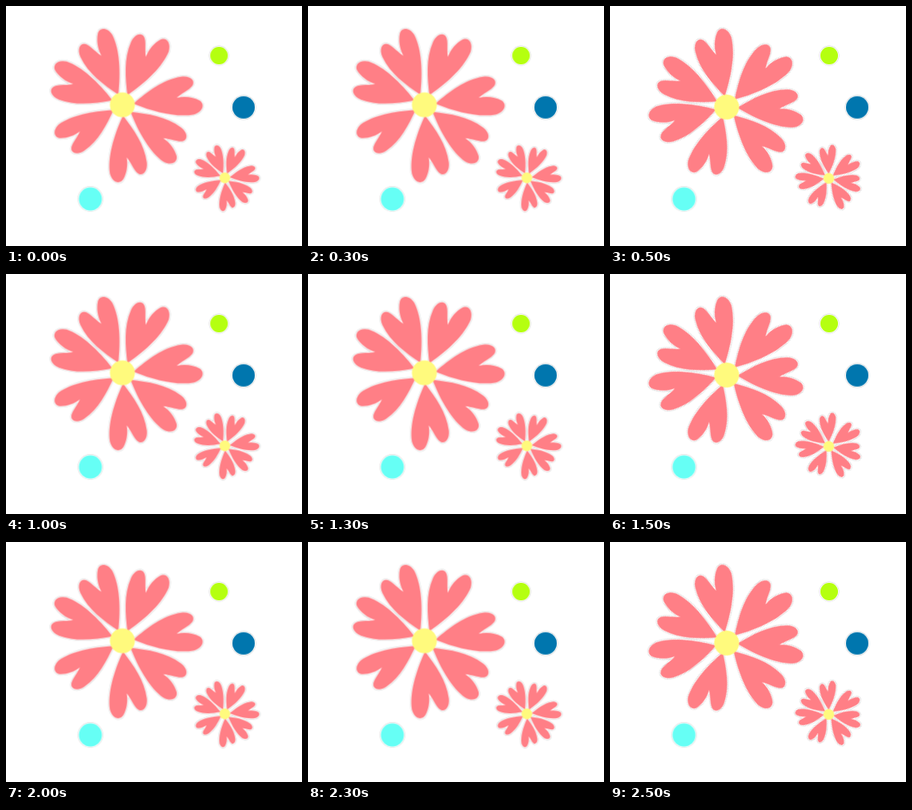
An HTML page for the animation above (3000 ms loop, 370 px wide and 300 px high).

```html
<!DOCTYPE html>
<html lang="en">
<head>
<meta charset="utf-8">
<title>Flowers and dots</title>
<style>
  html, body { margin: 0; width: 100%; height: 100%; overflow: hidden; background: #fff; }
  svg { display: block; }
  .rim use, .rim circle { fill: none; stroke: #d2d2d2; stroke-width: 3; }
  .gap use, .gap circle { fill: #fff; stroke: #fff; stroke-width: 2; }
</style>
</head>
<body>
<svg width="370" height="300" viewBox="0 0 370 300">
  <defs>
    <path id="petal" vector-effect="non-scaling-stroke"
      d="M14 0C32 -11 52 -23 75 -23.5C86 -23.5 91 -17 88 -12C85 -7 76 -5 66 1C76 0 86 3 93 8C99 13 96 22 84 24C64 25 38 15 14 1Z"/>
  </defs>
</svg>
<script>
const svg = document.querySelector('svg');
const PINK = '#ff7f86', YELLOW = '#fffa7d';
const LAYERS = ['rim', 'gap', 'fill'];

// [angle, size] of each petal
const PETALS = [[-114, 1.01], [-64.8, 1.01], [-8.2, 1.035], [38.4, 1],
                [84.4, 1], [147, .95], [202, 1.01]];

// Two poses per flower: [x, y, turn]
const FLOWERS = [
  { size: 1, poses: [[145.5, 123.5, 0], [145.8, 126.3, -37.4]] },
  { size: .43, poses: [[273.5, 214.8, 0], [273.5, 215.5, -27.8]] }
];

const DOTS = [
  { r: 11, color: '#b5ff10', poses: [[266.3, 62], [274, 62]] },
  { r: 14, color: '#0076ae', poses: [[297, 126.7], [309, 126.7]] },
  { r: 14.4, color: '#66fff5', poses: [[105.5, 241.2], [92.5, 241.2]] }
];

function add(parent, tag, attrs = {}) {
  const el = document.createElementNS('http://www.w3.org/2000/svg', tag);
  for (const key in attrs) el.setAttribute(key, attrs[key]);
  parent.append(el);
  return el;
}

// Hold each pose for half a second, then jump
function hop(el, poses, size = 1) {
  const [a, b] = poses.map(([x, y, turn = 0]) =>
    `translate(${x}px, ${y}px) rotate(${turn}deg) scale(${size})`);
  el.animate([
    { transform: a, offset: 0, easing: 'step-end' },
    { transform: b, offset: .5, easing: 'step-end' },
    { transform: b, offset: 1 }
  ], { duration: 1000, iterations: Infinity }).startTime = 0;
}

for (const { size, poses } of FLOWERS) {
  const flower = add(svg, 'g');
  for (const layer of LAYERS) {
    const g = add(flower, 'g', { class: layer, fill: PINK });
    for (const [angle, scale] of PETALS)
      add(g, 'use', { href: '#petal', transform: `rotate(${angle}) scale(${scale})` });
  }
  add(flower, 'circle', { r: 15.6, fill: YELLOW });
  hop(flower, poses, size);
}

for (const { r, color, poses } of DOTS) {
  const dot = add(svg, 'g');
  for (const layer of LAYERS)
    add(add(dot, 'g', { class: layer, fill: color }), 'circle', { r });
  hop(dot, poses);
}
</script>
</body>
</html>
```
